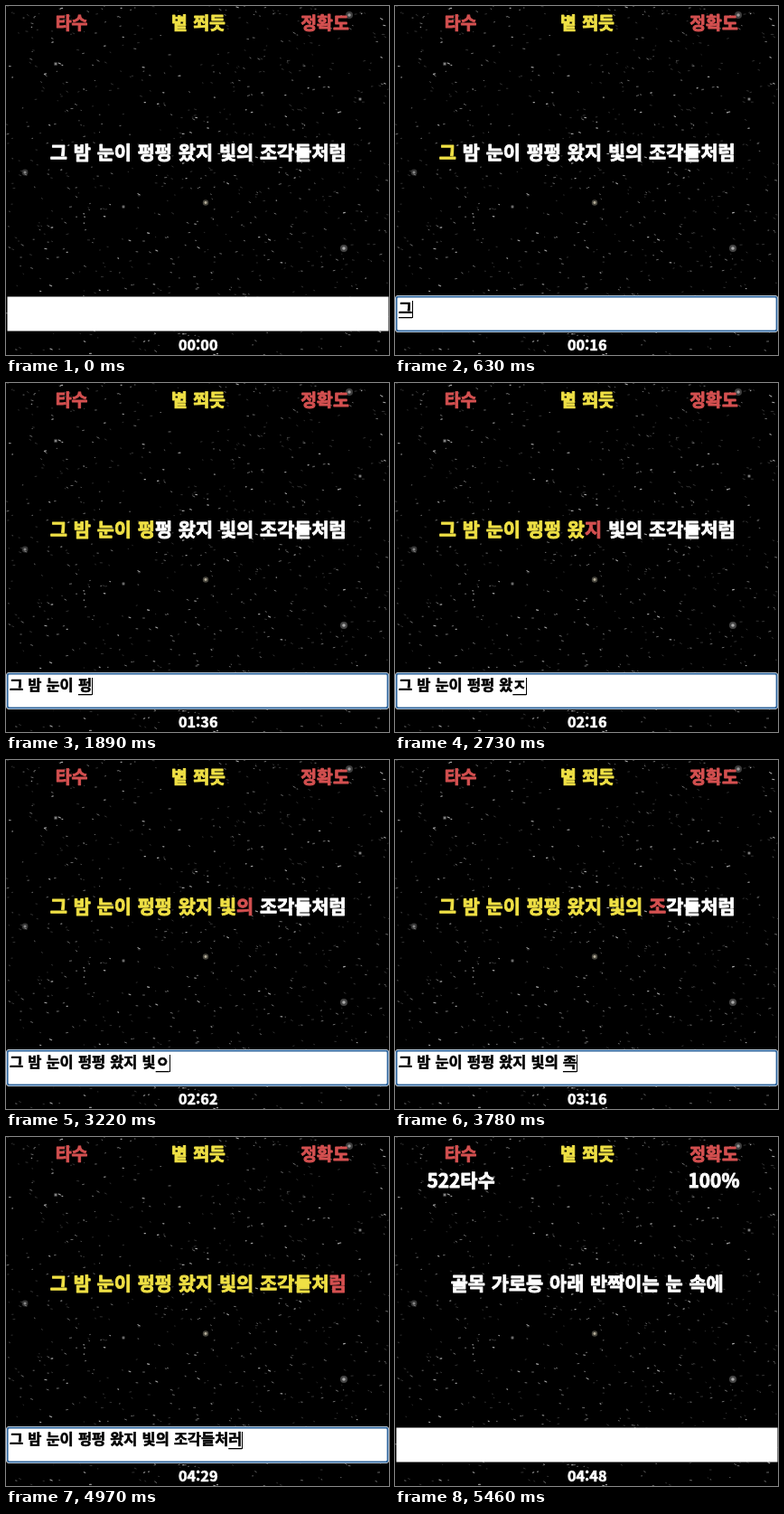
These frames come from a looping animation (424x386 px, 5.6 s). An HTML page:

```html
<!DOCTYPE html>
<html lang="ko">
<head>
<meta charset="utf-8">
<style>
  html, body { margin: 0; width: 100%; height: 100%; overflow: hidden; background: #000; }
  svg { display: block; width: 424px; height: 386px; }
  text {
    font-family: "Noto Sans CJK KR", "Noto Sans CJK", sans-serif;
    font-weight: 700; white-space: pre; word-spacing: 1px;
    fill: #fff; stroke: #fff; stroke-width: .9; stroke-linejoin: round; text-anchor: middle;
  }
  .head { font-size: 19.4px; }
  .big { font-size: 20.8px; }
  .timer { font-size: 16.2px; word-spacing: 0; stroke-width: .6; }
  .typed { font-size: 16.4px; word-spacing: .6px; fill: #000; stroke: #000; stroke-width: .6; text-anchor: start; }
  .red { fill: #d45050; stroke: #d45050; }
  .yellow { fill: #efe045; stroke: #efe045; }
</style>
</head>
<body>
<svg viewBox="0 0 424 386">
  <rect width="424" height="386" fill="#000"/>
  <g id="sky" stroke-linecap="round" fill="none"></g>
  <text class="head red" x="72.5" y="25.5">타수</text>
  <text class="head yellow" x="213" y="25.5">볕 쬐듯</text>
  <text class="head red" x="353" y="25.5">정확도</text>
  <g id="score">
    <text class="big" x="73" y="55.5">522타수</text>
    <text class="big" x="353" y="55.5">100%</text>
  </g>
  <text id="line" class="big" x="212.7" y="169.5"></text>
  <rect x="1.5" y="321.5" width="422" height="38" fill="#fff"/>
  <g id="ring" fill="none">
    <rect x=".5" y="320.5" width="423" height="40" rx="2.5" stroke="#dfe6ee"/>
    <rect x="1.7" y="321.7" width="420.8" height="37.6" rx="2" stroke="#2b639c" stroke-width="1.7"/>
  </g>
  <text id="typed" class="typed" x="4" y="340"></text>
  <rect id="underline" y="344" height="1.3"/>
  <rect id="caret" y="326" width="1" height="19"/>
  <text id="timer" class="timer" x="212.7" y="380.7"></text>
</svg>
<script>
const LOOP = 5600, STEP = 70, FOCUS = 70, FIRST_KEY = 420, SUBMIT = 5460;
const LINE = '그 밤 눈이 펑펑 왔지 빛의 조각들처럼';
const NEXT_LINE = '골목 가로등 아래 반짝이는 눈 속에';

// Input-method stages while each character of LINE is composed
const STAGES = ['ㄱ그', ' ', 'ㅂ바밤', ' ', 'ㄴ누눈', 'ㅇ이', ' ', 'ㅍ퍼펑', 'ㅍ퍼펑', ' ',
  'ㅇ오와왔', 'ㅈ지', ' ', 'ㅂ비빛', 'ㅇ으의', ' ', 'ㅈ조족', '가각', 'ㄷ드들', 'ㅊ처철', '러럼'];
const KEYS = STAGES.flatMap((stages, i) =>
  [...stages].map(ch => ({ done: LINE.slice(0, i), current: ch })));

// Typing rhythm: [time, keys pressed]
const RHYTHM = [[FIRST_KEY, 1], [1190, 7.4], [1890, 16.4], [2730, 25.4], [3220, 31.4], [4410, 45.4], [5180, 47]];

const el = id => document.getElementById(id);
const show = (id, on) => el(id).setAttribute('visibility', on ? 'visible' : 'hidden');

function drawSky() {
  let seed = 71;
  const rand = () => (seed = (seed * 16807) % 2147483647) / 2147483647;
  const layers = [['#383838', .9, 480], ['#6c6c6c', 1, 300], ['#a8a8a8', 1.1, 100]];
  let markup = layers.map(([color, width, count]) => {
    let d = '';
    for (let i = 0; i < count; i++) {
      const x = rand() * 424, y = rand() * 386, len = .3 + rand() * 2;
      d += `M${x.toFixed(1)} ${y.toFixed(1)}l${len.toFixed(1)} ${(len * (rand() - .3)).toFixed(1)}`;
    }
    return `<path d="${d}" stroke="${color}" stroke-width="${width}"/>`;
  }).join('');
  const glows = [[374, 268, 4, '#aaa'], [221, 217.5, 3.2, '#b5ae9a'], [21, 184, 3.4, '#888'],
    [55, 64, 2.2, '#999'], [380, 10, 4, '#999'], [392, 103, 2, '#999'], [130, 222, 1.9, '#999']];
  for (const [x, y, r, color] of glows)
    markup += `<circle cx="${x}" cy="${y}" r="${r}" fill="${color}" opacity=".4"/>` +
      `<circle cx="${x}" cy="${y}" r="${r * .45}" fill="${color}"/>`;
  el('sky').innerHTML = markup;
}

function keysAt(t) {
  if (t < FIRST_KEY) return 0;
  const i = RHYTHM.findIndex(([time]) => time > t);
  if (i < 0) return KEYS.length;
  const [t0, k0] = RHYTHM[i - 1], [t1, k1] = RHYTHM[i];
  return Math.floor(k0 + (k1 - k0) * (t - t0) / (t1 - t0));
}

function colorLine(typed) {
  return [...LINE].map((ch, i) => {
    if (i >= typed.length) return ch;
    return `<tspan class="${typed[i] === ch ? 'yellow' : 'red'}">${ch}</tspan>`;
  }).join('');
}

function clock(t) {
  const ticks = Math.floor(Math.min(448, Math.max(0, t / STEP * 6.65 - 42.92)));
  const pad = n => String(n).padStart(2, '0');
  return pad(Math.floor(ticks / 100)) + ':' + pad(ticks % 100);
}

function typedWidth(text) {
  el('typed').textContent = text;
  return text ? el('typed').getComputedTextLength() : 0;
}

function render(t) {
  const finished = t >= SUBMIT, focused = t >= FOCUS && !finished;
  const count = finished ? 0 : keysAt(t);
  const { done, current } = count ? KEYS[count - 1] : { done: '', current: '' };

  el('line').innerHTML = finished ? NEXT_LINE : colorLine(done + current);
  el('timer').textContent = clock(t);
  show('score', finished);
  show('ring', focused);
  show('caret', focused);

  const start = 4 + typedWidth(done), end = 4 + typedWidth(done + current);
  el('caret').setAttribute('x', Math.round(end));
  el('underline').setAttribute('x', start);
  el('underline').setAttribute('width', end - start);
  show('underline', current.trim() !== '');
}

drawSky();
const began = performance.now();
let last = -1;
function tick() {
  const step = Math.floor(((performance.now() - began) % LOOP) / STEP);
  if (step !== last) render((last = step) * STEP);
  requestAnimationFrame(tick);
}
tick();
</script>
</body>
</html>
```
